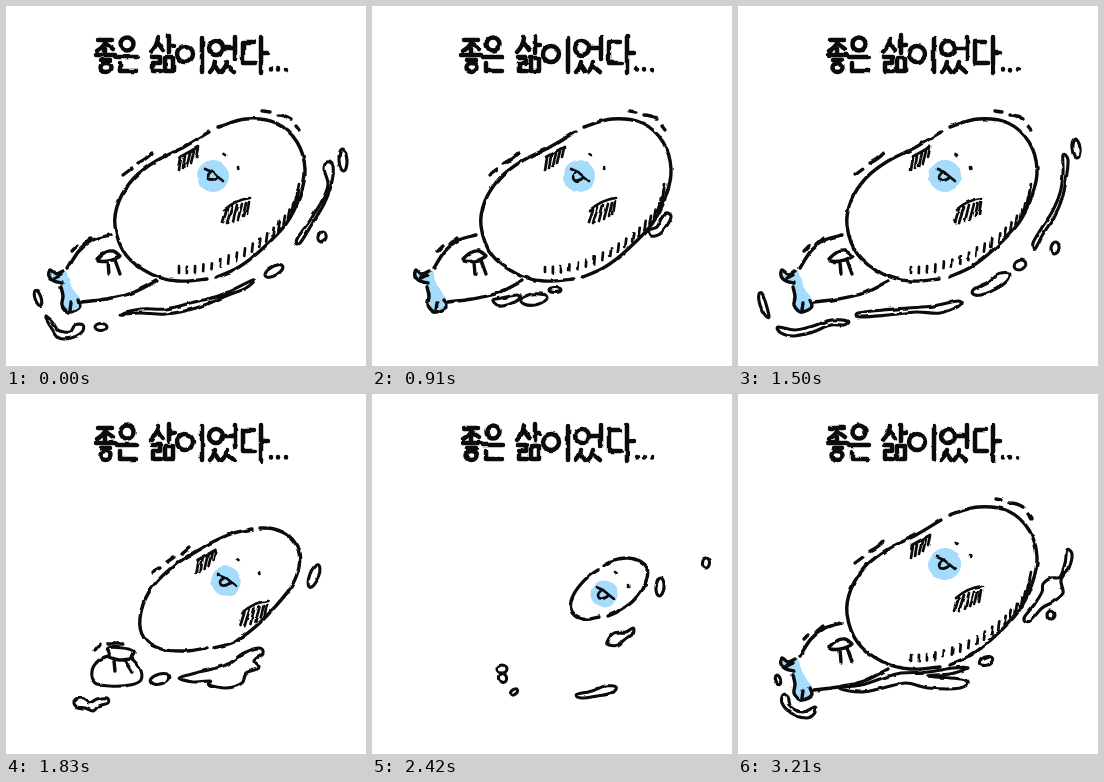
Recreate the animation shown at these times as an HTML page. Size 360x360 px, loop 3340 ms.

```html
<!DOCTYPE html>
<html lang="ko">
<head>
<meta charset="utf-8">
<style>
  html, body { margin: 0; width: 100%; height: 100%; overflow: hidden; background: #fff; }
  svg { display: block; width: 100vw; height: 100vh; }
  .ink { fill: none; stroke: #0b0b0b; stroke-width: 3.4; stroke-linecap: round; stroke-linejoin: round; }
  .wave { fill: #fff; stroke-width: 3.1; }
  .thin { stroke-width: 2.7; }
  .letters { stroke-width: 4.5; }
  .blue { fill: #a5dcfb; }
  .paper { fill: #fff; }
</style>
</head>
<body>
<svg viewBox="0 0 360 360" role="img" aria-label="좋은 삶이었다...">
  <title>좋은 삶이었다...</title>
  <filter id="rough" filterUnits="userSpaceOnUse" x="0" y="0" width="360" height="360" color-interpolation-filters="sRGB">
    <feTurbulence id="grain" type="fractalNoise" baseFrequency="0.09" numOctaves="2"/>
    <feDisplacementMap in="SourceGraphic" scale="3" xChannelSelector="R" yChannelSelector="G"/>
  </filter>
  <g filter="url(#rough)">
    <rect class="paper" width="360" height="360"/>
    <g id="scene"></g>
    <path id="title" class="ink letters"/>
  </g>
</svg>
<script>
const lerp = (a, b, t) => a + (b - a) * t;
const points = s => s.split(' ').map(p => p.split(',').map(Number));
const mix = (a, b, t) => a.map((p, i) => p.map((v, k) => lerp(v, b[i][k], t)));
const path = (d, cls = '') => `<path class="ink ${cls}" d="${d}"/>`;
const group = (transform, content) => `<g transform="${transform}">${content}</g>`;

// Smooth curve through points (Catmull-Rom as cubic Béziers).
function curve(pts, closed = false) {
  const n = pts.length;
  const at = i => closed ? pts[(i + n) % n] : pts[Math.max(0, Math.min(n - 1, i))];
  let d = 'M' + pts[0];
  for (let i = 0; i < (closed ? n : n - 1); i++) {
    const [a, b, c, e] = [at(i - 1), at(i), at(i + 1), at(i + 2)];
    d += 'C' + [0, 1].map(k => b[k] + (c[k] - a[k]) / 6) +
         ' ' + [0, 1].map(k => c[k] - (e[k] - b[k]) / 6) + ' ' + c;
  }
  return d + (closed ? 'Z' : '');
}
const line = s => curve(points(s));
const oval = (x, y, rx, ry, turn = 0) =>
  `<ellipse class="ink wave" rx="${rx}" ry="${ry}" transform="translate(${x} ${y}) rotate(${turn})"/>`;
const blob = s => path(curve(points(s), true), 'wave');
const circle = (c, r, cls) => `<circle class="${cls}" cx="${c[0]}" cy="${c[1]}" r="${r}"/>`;

// Body stages: afloat, half sunk, almost under.
const leftArc = [
  '203,126 178,141 150,155 128,172 113,195 109,220 120,249 145,268 172,275 201,273',
  '246,135 222,141 192,156 164,175 143,198 134,224 138,244 155,255 180,257 200,254',
  '226,176 217,182 209,190 203,198 199,207 199,216 203,222 210,225 218,225 227,223'
].map(points);
const rightArc = [
  '212,121 240,113 270,117 291,136 299,163 294,190 280,218 255,244 233,261 211,271',
  '254,134 268,135 283,142 292,155 293,173 285,193 268,214 248,234 228,248 207,254',
  '231,172 242,166 256,164 268,167 275,174 275,184 270,196 260,208 247,217 236,222'
].map(points);
// Cheek centre, two eyes.
const face = [
  '207,170 217.5,148 232,161',
  '220,187 231,165 253,178',
  '232,200 243,178 256,191'
].map(points);

const waves = {
  none: '',
  near: blob('294,207 299,210 296,218 288,228 279,230 277,224 285,221 289,213') +
    oval(183, 284, 6, 2.5) + blob('149,293 160,288 173,289 174,294 163,299 152,298') +
    blob('121,294 130,292 145,289 147,293 138,298 127,300'),
  mid: blob('329,156 334,160 331,174 323,186 325,199 315,208 304,214 292,227 286,224 296,211 304,198 305,190 313,184 322,183 327,169') +
    oval(313, 221, 4, 4) + oval(248, 267, 7, 4, -20) +
    blob('101,294 123,291 145,284 163,279 190,278 215,274 230,274 212,280 190,282 228,286 222,294 190,294 168,289 145,294 122,298') +
    blob('45,301 50,302 53,313 65,318 77,313 76,320 68,324 53,319 44,309') + oval(40, 286, 2.5, 5, -15),
  wide: blob('321,156 327,160 325,180 318,198 306,218 294,237 291,233 305,213 317,193 322,178 318,163') +
    oval(337, 154, 4, 11, -3) + oval(316, 231, 4, 5, 20) + oval(268, 265, 10, 4.5, -30) +
    blob('114,308 135,303 160,303 185,297 215,289 247,274 240,282 220,290 190,302 160,308 135,307') +
    blob('39,310 46,315 52,324 64,326 69,319 77,319 76,326 65,332 53,332 46,323') +
    oval(32, 292, 3, 8, -18) + oval(95, 321, 6, 3.5),
  far: blob('325,149 330,154 328,174 324,193 316,211 305,228 297,243 295,237 303,223 314,206 322,187 325,168') +
    oval(338, 142, 4, 9, -8) + oval(317, 242, 4, 6, 10) + oval(282, 259, 6, 4.5, -25) +
    blob('236,283 250,276 260,268 271,267 270,274 258,283 243,289 235,288') +
    blob('120,307 145,304 170,302 195,300 220,295 221,300 202,307 178,306 150,309 123,311') +
    blob('40,321 57,324 75,320 93,314 109,315 106,319 92,319 75,326 56,330 43,327') +
    blob('21,288 25,289 31,310 27,309 22,299'),
  broken: oval(336, 149, 3, 6, -5) + oval(321, 231, 4, 11, 25) + oval(265, 286, 10, 4.5, -25) +
    blob('58,338 67,332 86,328 87,333 75,338 62,342') +
    blob('147,319 158,316 177,317 193,320 180,322 160,321') + oval(198, 318, 4, 2) + oval(50, 328, 2, 1.5),
  drops: oval(331, 240, 2.5, 5, 25) + oval(268, 298, 5, 2.5, -20) + oval(71, 344, 7, 2.5, -10),
  sink: blob('173,284 190,279 206,275 222,270 238,259 253,254 257,259 248,267 253,274 240,279 236,289 220,294 203,291 204,287 188,288') +
    oval(154, 285, 10, 5, -15) + oval(308, 182, 4.5, 12, 20) +
    blob('68,308 75,304 83,309 91,305 101,304 102,309 93,312 87,317 79,314 71,313'),
  last: oval(288, 193, 4, 9, 5) + oval(334, 169, 3.5, 5, 8) +
    blob('235,248 242,239 254,238 261,234 261,239 253,245 246,251 237,251') +
    blob('206,300 220,297 233,292 244,293 240,299 225,302 209,304') +
    oval(130, 275, 5, 4) + oval(131, 284, 3.5, 4.5, -15) + oval(142, 298, 4, 2.5, -35)
};

const hatching = path('M174 151L192 141M175 152L173 164M179 150L177 162M184 147L181 160M188 145L185 157M192 142L190 151' +
  'M218 204Q229 194 244 192M221 203L217 216M226 201L221 217M231 199L227 215M236 198L232 213M240 197L237 210M243 196L241 208', 'thin');

function bellyTicks() {
  let d = '';
  for (let i = 0; i < 20; i++) {
    const t = i / 19, u = 1 - t;
    const on = (a, b, c, e) => u*u*u*a + 3*u*u*t*b + 3*u*t*t*c + t*t*t*e;
    const x = on(173, 222, 290, 292), y = on(264, 266, 223, 183), h = 3 + t * 2;
    d += `M${x + t} ${y - h}L${x - t} ${y + h}`;
  }
  return path(d, 'thin');
}

const tail =
  '<path class="paper" d="M106 229Q72 235 60 265L75 296Q115 293 150 275Z"/>' +
  '<path class="blue" d="M60 264L52 268L44 265L44 272L54 278L56 300L64 306L74 300L74 292Q64 282 60 264Z"/>' +
  path(line('104,229 87,234 73,245 62,262') + line('76,296 100,293 126,287 150,275') +
    line('57,265 50,268 44,264 43,270 48,275 56,277') + line('55,281 57,290 56,299 62,306 70,304 74,300 72,294') +
    'M49 272L55 269M64 304L65 297' + line('91,253 98,247 107,245 114,250') + 'M92 255Q102 257 113 251M102 256L103 268M109 254L114 268');

const pouch =
  blob('86,277 92,267 103,261 102,254 116,254 128,257 126,264 134,274 135,286 124,291 104,292 89,289') +
  path(line('103,263 113,266 125,265') + 'M108 267L109 277M119 267L126 278M89 256L94 250M101 250L117 250');

const floatMarks = path('M117 169L125 163M132 157Q139 154 146 147M257 105L264 106M272 109Q279 109 285 113M290 120L293 124M66 245L71 240M78 238L85 232');
const sinkMarks = path('M147 178L154 174M161 168L168 163M176 160L183 154');
const beak = path('M-8 -7L-1 -4L5 1L10 5M-2 -4Q-8 0 -5 4Q0 6 5 1', 'thin');
const ticks = bellyTicks();

function drawBody(depth) {
  if (depth >= 3) return '';
  const step = Math.min(1, Math.floor(depth)), t = Math.min(1, depth - step);
  const stage = set => mix(set[step], set[step + 1], t);
  const left = stage(leftArc), right = stage(rightArc), [cheek, eyeA, eyeB] = stage(face);
  const fill = curve([...left, ...right.slice().reverse()], true);
  let out = `<path class="paper" d="${fill}"/>` + path(curve(left) + curve(right)) +
    circle(cheek, lerp(16, 13.5, Math.min(1, depth / 2)), 'blue') +
    group(`translate(${cheek})`, beak) + path(`M${eyeA}l1.5 1M${eyeB}l.3 2`, 'thin');
  if (depth < 1.4) out += group(`translate(${17.5 * depth} ${15 * depth})`, hatching);
  if (depth < .3) out += ticks;
  if (depth <= 2) return out;
  return group(`translate(238 195) scale(${3 - depth}) translate(-238 -195)`, out);
}

// Duration, depth, ripple shape, ripple spread.
const timeline = [
  [130, 0, 'wide', 1], [130, 0, 'far', 1.03], [130, 0, 'broken', .97], [130, 0, 'broken', 1],
  [130, 0, 'broken', 1.03], [130, 0, 'drops', 1], [130, 0, 'none', 1], [130, 0, 'near', 1],
  [130, 0, 'near', 1.05], [130, 0, 'mid', 1], [100, 0, 'mid', 1.03], [100, 0, 'wide', 1],
  [130, 0, 'far', 1], [100, 0, 'broken', .97], [100, .4, 'broken', 1], [100, 1, 'sink', 1],
  [130, 1.3, 'sink', 1.02], [130, 1.55, 'last', .92], [130, 1.75, 'last', .96], [100, 1.9, 'last', .98],
  [130, 2, 'last', 1], [130, 2.35, 'last', 1.03], [130, 2.7, 'drops', .9], [100, 3, 'none', 1],
  [100, 1.8, 'none', 1], [100, 1, 'none', 1], [100, 0, 'near', 1], [130, 0, 'mid', 1]
];
const loop = timeline.reduce((sum, [ms]) => sum + ms, 0);

const ring = (x, y, rx, ry = rx) => `M${x - rx} ${y}a${rx} ${ry} 0 1 1 ${2 * rx} 0a${rx} ${ry} 0 1 1 ${-2 * rx} 0`;
document.getElementById('title').setAttribute('d',
  'M92 34H106M100 35Q98 41 91 45M100 38L107 43M99 43V48M90 49H109M95 54H104' + ring(99.5, 61.5, 5, 4.5) +
  ring(121, 38, 6.5) + 'M111 51H131M114 57V65H130' +
  'M152 32Q151 40 145 46M152 37L157 44M163 30V47M163 39H168M146 51H154V57H147V65H155M159 52H167V65H159Z' +
  ring(179, 48, 8) + 'M196 32V66' +
  ring(210, 42, 7) + 'M219 42H228M229 31V53M209 56Q208 62 204 66M209 60L213 66M221 56Q220 62 216 66M221 60L228 66' +
  'M248 36H237V57H249M255 31V67M256 47H262M265 63v.5M272 63v.5M280 63v.5');

const scene = document.getElementById('scene');
const grain = document.getElementById('grain');
let shown = -1;

function draw(index) {
  const [, depth, ripple, spread] = timeline[index];
  let out = group(`translate(200 200) scale(${spread}) translate(-200 -200)`, waves[ripple]);
  if (depth < .5) out += group(`translate(${depth * 30} ${-depth * 10})`, tail) + floatMarks;
  else if (depth < 1.4) out += pouch + sinkMarks;
  scene.innerHTML = out + drawBody(depth);
  grain.setAttribute('seed', index + 1);
}

function tick() {
  let time = performance.now() % loop, index = 0;
  while (time >= timeline[index][0]) time -= timeline[index++][0];
  if (index !== shown) draw(shown = index);
  requestAnimationFrame(tick);
}
tick();
</script>
</body>
</html>
```
